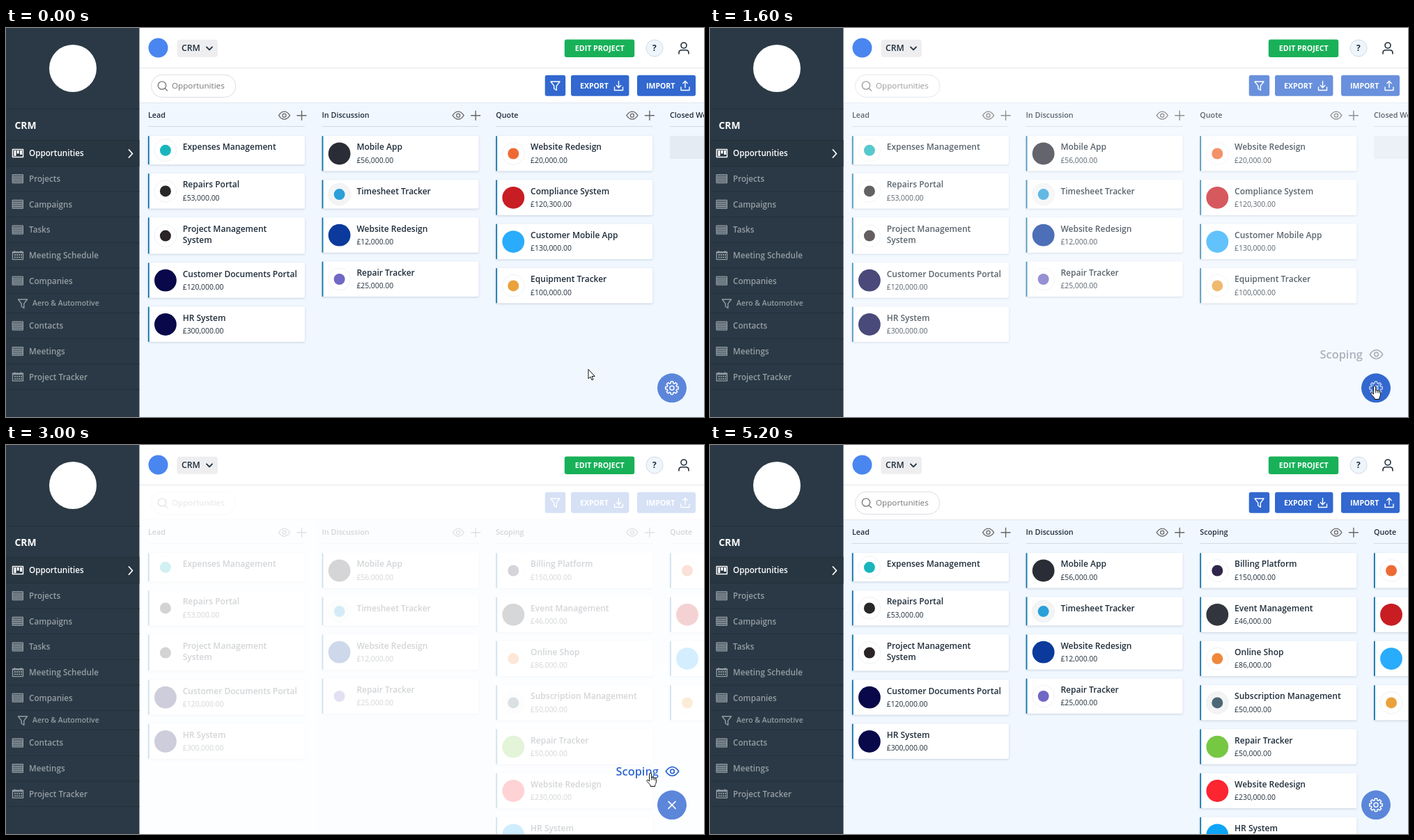
Recreate the animation shown at these times as an HTML page. Size 1002x559 px, loop 6740 ms.

```html
<!DOCTYPE html>
<html lang="en">
<head>
<meta charset="utf-8">
<title>CRM board</title>
<style>
html, body { margin: 0; width: 100%; height: 100%; overflow: hidden; background: #f0f7ff; }
svg { display: block; width: 100vw; height: 100vh; }
text { font-family: "Open Sans", "Noto Sans", sans-serif; font-weight: 600; white-space: pre; }
.line { fill: none; stroke-linecap: round; stroke-linejoin: round; }
.card { filter: drop-shadow(0 1px 1.5px rgba(40, 60, 90, .2)); }

.anim { animation: 6740ms step-end infinite; }
.cursor { animation-name: move, leave; }
.hand { animation-name: hand; }
.arrow { animation-name: arrow; }
.veil { animation-name: veil; }
.gear { animation-name: gear; }
.disc { animation-name: disc; }
.label { animation-name: label; }
.before { animation-name: before; }
.after { animation-name: after; }
.lit { animation-name: lit; }

@keyframes move {
  0% { transform: translate(830px, 490px); }
  9.94% { transform: translate(830px, 490px); animation-timing-function: steps(3, start); }
  12.9% { transform: translate(852px, 495px); animation-timing-function: steps(4, start); }
  16.86% { transform: translate(930px, 509px); animation-timing-function: steps(3, start); }
  19.83% { transform: translate(948px, 514px); }
  31.6% { transform: translate(948px, 514px); animation-timing-function: steps(1, start); }
  32.59% { transform: translate(946px, 514px); animation-timing-function: steps(7, start); }
  39.54% { transform: translate(920px, 470px); }
  41.54% { transform: translate(919px, 471px); }
  61.27% { transform: translate(915px, 473px); }
  65.28% { transform: translate(915px, 473px); animation-timing-function: steps(3, start); }
  68.24% { transform: translate(911px, 456px); }
  69.28% { transform: translate(906px, 457px); }
  74.18% { transform: translate(906px, 457px); animation-timing-function: steps(3, start); }
  77.14%, 100% { transform: translate(868px, 538px); }
}
@keyframes leave { 0% { opacity: 1; } 77.14%, 100% { opacity: 0; } }
@keyframes hand {
  0%, 34.56%, 65.28%, 100% { opacity: 0; }
  16.86%, 37.56% { opacity: 1; }
}
@keyframes arrow {
  0%, 34.56%, 65.28%, 100% { opacity: 1; }
  16.86%, 37.56% { opacity: 0; }
}
@keyframes veil {
  0% { opacity: 0; }
  23.73% { opacity: 0; animation-timing-function: steps(3, start); }
  26.7% { opacity: 1; }
  45.5% { opacity: 1; animation-timing-function: steps(3, start); }
  48.46%, 100% { opacity: 0; }
}
@keyframes gear {
  0% { opacity: 1; }
  23.73% { opacity: 1; animation-timing-function: steps(3, start); }
  26.7% { opacity: 0; }
  45.5% { opacity: 0; animation-timing-function: steps(3, start); }
  48.46%, 100% { opacity: 1; }
}
@keyframes disc {
  0%, 34.56%, 100% { fill: #5b86da; }
  16.86% { fill: #3268cf; }
}
@keyframes label {
  0%, 48.46%, 100% { color: #1f2d3a; }
  37.56% { color: #3268cf; }
}
@keyframes before { 0% { opacity: 1; } 44.5%, 100% { opacity: 0; } }
@keyframes after { 0% { opacity: 0; } 44.5%, 100% { opacity: 1; } }
@keyframes lit {
  0%, 65.28%, 100% { filter: drop-shadow(0 1px 1.5px rgba(40, 60, 90, .2)); }
  47.47% { filter: drop-shadow(0 1px 4px rgba(40, 60, 90, .2)); }
}
</style>
</head>
<body>
<svg id="stage" viewBox="0 0 1002 559" preserveAspectRatio="none"></svg>
<script>
const INK = '#1f2d3a', BLUE = '#3268cf', GREY = '#969ea4', SIDE = 191.5;

const text = (x, y, s, size, fill = INK, weight = 600) =>
  `<text x="${x}" y="${y}" font-size="${size}" fill="${fill}" style="font-weight:${weight}">${s}</text>`;
const rect = (x, y, w, h, fill, r = 0, more = '') =>
  `<rect x="${x}" y="${y}" width="${w}" height="${h}" rx="${r}" fill="${fill}" ${more}/>`;
const circle = (x, y, r, fill, more = '') =>
  `<circle cx="${x}" cy="${y}" r="${r}" fill="${fill}" ${more}/>`;
const line = (d, stroke, width = 1.4, x = 0, y = 0) =>
  `<path class="line" d="${d}" stroke="${stroke}" stroke-width="${width}" transform="translate(${x} ${y})"/>`;
const anim = (name, body) => `<g class="anim ${name}">${body}</g>`;

const eye = (x, y, stroke, width, k = 1) => `<g transform="translate(${x} ${y}) scale(${k})">` +
  line('M-8 0Q-4.5 -5.5 0 -5.5T8 0Q4.5 5.5 0 5.5T-8 0Z', stroke, width) +
  circle(0, 0, 2.5, 'none', `stroke="${stroke}" stroke-width="${width}"`) + '</g>';
const funnel = (x, y, stroke) => line('M-6.5 -6H6.5L1.8 .2V6.5L-1.8 4V.2Z', stroke, 1.4, x, y);

// Sidebar
const icons = {
  board: (y, c) => line('M9.5 -5.5H24.5V5.5H9.5Z', c, 1.5, 0, y) +
    rect(11.5, y - 4, 3, 8, c) + rect(15.7, y - 4, 3, 4.5, c) + rect(20, y - 4, 3, 6, c),
  list: (y, c) => rect(9, y - 6.5, 16, 13, '#596670', 1) +
    line('M9.5 -6H24.5V6H9.5ZM9.5 -2.5H24.5M9.5 .4H24.5M9.5 3.2H24.5', c, 1, 0, y),
  date: (y, c) => line('M9.5 -5H24.5V6H9.5ZM9.5 -3.7H24.5M12.5 -6.3V-5M21.5 -6.3V-5', c, 1.3, 0, y) +
    `<path d="M12 ${y - .5}H23M12 ${y + 3}H23" stroke="${c}" stroke-width="2" stroke-dasharray="2 1"/>`
};
const menu = [
  ['Opportunities', 180, 'board'], ['Projects', 216.7, 'list'], ['Campaigns', 253.3, 'list'],
  ['Tasks', 290, 'list'], ['Meeting Schedule', 326.6, 'date'], ['Companies', 363.2, 'list'],
  ['Contacts', 428, 'list'], ['Meetings', 464.6, 'list'], ['Project Tracker', 501.2, 'date']
];
function sidebar() {
  let s = rect(0, 0, SIDE, 559, '#2a3945') + rect(0, 162, SIDE, 36, '#283641');
  for (const y of [116, 161, 198, 234.6, 271, 308, 344.6, 381, 409, 446, 482.6, 519])
    s += rect(0, y, SIDE, 1, '#23303a');
  s += circle(96, 58, 34, '#fff') + text(12.5, 144.6, 'CRM', 13.9, '#fff', 700);
  menu.forEach(([name, y, icon], i) => {
    const c = i ? GREY : '#fff';
    s += icons[icon](y, c) + text(33, y + 4.4, name, 11.66, c);
  });
  return s + line('M176.5 175L181.5 180.5L176.5 186', '#fff', 1.8) +
    funnel(24, 396, GREY) + text(38, 399.2, 'Aero &amp; Automotive', 10.45, GREY);
}

// Header and toolbar
function header() {
  return rect(SIDE, 0, 811, 57, '#fff') + rect(SIDE, 57, 811, 1, '#e2e6eb') +
    circle(218.5, 28.5, 14, '#4a86f0') +
    rect(245.5, 16.7, 58.5, 25, '#eeeef0', 4) + text(252, 33.4, 'CRM', 12.2) +
    line('M288 27.3L292 31.3L296 27.3', INK, 1.8) +
    rect(801.8, 16.5, 100.4, 25.4, '#18b158', 3) + text(816.8, 33, 'EDIT PROJECT', 10.65, '#fff', 700) +
    circle(931, 29, 12, '#eff5fd', 'stroke="#d3dae3"') + text(928, 33.4, '?', 12, INK, 700) +
    circle(973, 25, 4, 'none', `stroke="${INK}" stroke-width="1.6"`) +
    line('M966 37V36Q966 31.8 970 31.8H976Q980 31.8 980 36V37', INK, 1.6);
}
function toolbar() {
  const tray = 'M-6 2V6.5H6V2';
  const button = (x, w, label = '') => rect(x, 67.7, w, 30, BLUE, 3) +
    text(x + 13, 86.7, label, 10.5, '#fff', 700);
  return rect(SIDE, 58, 811, 49, '#fff') + rect(SIDE, 107, 811, 1, '#e2e7ed') +
    rect(208.5, 67.2, 121.3, 32.3, '#fff', 16, 'stroke="#d9dee4"') +
    circle(224, 82.5, 5.7, 'none', 'stroke="#777" stroke-width="1.3"') +
    line('M228.2 86.8L231.5 90', '#777', 1.3) +
    text(238, 87.3, 'Opportunities', 11.66, '#777', 400) +
    button(773.7, 29.5) + funnel(788.5, 83, '#fff') +
    button(811, 83.4, 'EXPORT') +
    line(tray + 'M0 -6.5V2.5M-3.2 -.5L0 2.7L3.2 -.5', '#fff', 1.4, 879.5, 83) +
    button(906, 84, 'IMPORT') +
    line(tray + 'M0 2.5V-6.5M-3.2 -3.5L0 -6.7L3.2 -3.5', '#fff', 1.4, 975, 83);
}

// Board: each card is [title, price, disc colour, inner mark colour]
const WHITE = '#fff', NAVY = '#08084a';
const lead = [
  ['Expenses Management', '', WHITE, '#19b5bd'],
  ['Repairs Portal', '£53,000.00', WHITE, '#2a2728'],
  ['Project Management|System', '', WHITE, '#2b2426'],
  ['Customer Documents Portal', '£120,000.00', NAVY],
  ['HR System', '£300,000.00', NAVY]
];
const talks = [
  ['Mobile App', '£56,000.00', '#2b2d36'],
  ['Timesheet Tracker', '', '#f3f4f5', '#2a9fd8'],
  ['Website Redesign', '£12,000.00', '#0b3a9c'],
  ['Repair Tracker', '£25,000.00', WHITE, '#7068c4']
];
const quote = [
  ['Website Redesign', '£20,000.00', WHITE, '#ee6a35'],
  ['Compliance System', '£120,300.00', '#c71d23'],
  ['Customer Mobile App', '£130,000.00', '#29acfb'],
  ['Equipment Tracker', '£100,000.00', WHITE, '#e9a23c']
];
const scoping = [
  ['Billing Platform', '£150,000.00', WHITE, '#30254a'],
  ['Event Management', '£46,000.00', '#33353e'],
  ['Online Shop', '£86,000.00', WHITE, '#f0883c'],
  ['Subscription Management', '£50,000.00', '#f3f4f5', '#4c6775'],
  ['Repair Tracker', '£50,000.00', '#76c742'],
  ['Website Redesign', '£230,000.00', '#fc2530', '', 'anim lit'],
  ['HR System', '£75,000.00', '#0ea5f7']
];
const colX = i => 203.9 + i * 249.7;

function column(i, name, cards) {
  const x = colX(i);
  let y = 155;
  let s = text(x, 129, name, 10.75) + rect(x, 141, 225, 1, '#d3dae2') +
    eye(x + 195.6, 125.7, '#6a6a6a', 1.3) + line('M-6.5 0H6.5M0 -6.5V6.5', '#666', 1.4, x + 220.6, 125.7);
  for (const [title, price, disc, mark, extra = ''] of cards) {
    const rows = title.split('|');
    const h = price ? 50.6 : rows.length > 1 ? 52.3 : 41.2;
    const cx = x + 25, cy = y + h / 2 + .2;
    s += `<g class="card ${extra}">${rect(x, y, 225, h, WHITE, 2)}</g>` + rect(x, y, 1.8, h, '#0f73a8', .9) +
      circle(cx, cy, 15.9, disc, mark ? 'stroke="#e9ecef" stroke-width=".8"' : '');
    if (mark) s += circle(cx, cy, 8, mark);
    rows.forEach((row, n) => s += text(x + 49.8, y + 20.4 + n * 16, row, 12));
    if (price) s += text(x + 49.8, y + 38.8, price, 10.4, INK, 400);
    y += h + 12.7;
  }
  return s;
}
function board() {
  return rect(SIDE, 108, 811, 451, '#f0f7ff') +
    column(0, 'Lead', lead) + column(1, 'In Discussion', talks) +
    anim('before', column(2, 'Quote', quote) + column(3, 'Closed Won', []) +
      rect(colX(3), 155, 225, 33, '#e4ebf3')) +
    anim('after', column(2, 'Scoping', scoping) + column(3, 'Quote', quote));
}

// Floating button, overlay and pointer
function cog() {
  const pts = [];
  for (let i = 0; i < 8; i++)
    for (const [da, r] of [[-.27, 7], [-.18, 9.4], [.18, 9.4], [.27, 7]]) {
      const a = i * Math.PI / 4 + da;
      pts.push((r * Math.cos(a)).toFixed(2) + ' ' + (r * Math.sin(a)).toFixed(2));
    }
  return line('M' + pts.join('L') + 'Z', '#fff', 1.5, 956, 517.3) +
    circle(956, 517.3, 3, 'none', 'stroke="#fff" stroke-width="1.5"');
}
function overlay() {
  return anim('veil', rect(SIDE, 58, 811, 501, 'rgba(255,255,255,.8)') +
    anim('label', text(875.5, 475, 'Scoping', 16.4, 'currentColor') +
      eye(956.5, 469, 'currentColor', 1.5, 1.15)));
}
function button() {
  return `<circle class="anim disc" cx="956" cy="517.3" r="21"/>` +
    anim('gear', cog()) + anim('veil', line('M-5 -5L5 5M5 -5L-5 5', '#fff', 1.7, 956, 517.3));
}
function cursor() {
  const shape = d => `<path d="${d}" fill="#fff" stroke="#111" stroke-linejoin="round"/>`;
  return anim('cursor',
    anim('arrow', shape('M6 .5V14L9 11.2L11 15.9L13 15L11 10.5H15.2Z')) +
    anim('hand', shape('M4.6 11V2a1.5 1.5 0 0 1 3 0V7a1.3 1.3 0 0 1 2.5 .4a1.2 1.2 0 0 1 2.3 .6' +
      'a1.1 1.1 0 0 1 2 .7V13C14.4 15 13.2 16 12.8 17.5V19.5H6V17.8C4.8 16 3 14.5 1.2 12.4' +
      'C.1 11 1.6 9.6 2.9 10.6L4.6 12.2Z') +
      line('M7.6 7V10M10.1 7.5V10M12.4 8.2V10.4', '#111', .9)));
}

document.getElementById('stage').innerHTML =
  board() + toolbar() + overlay() + header() + sidebar() + button() + cursor();
</script>
</body>
</html>
```
